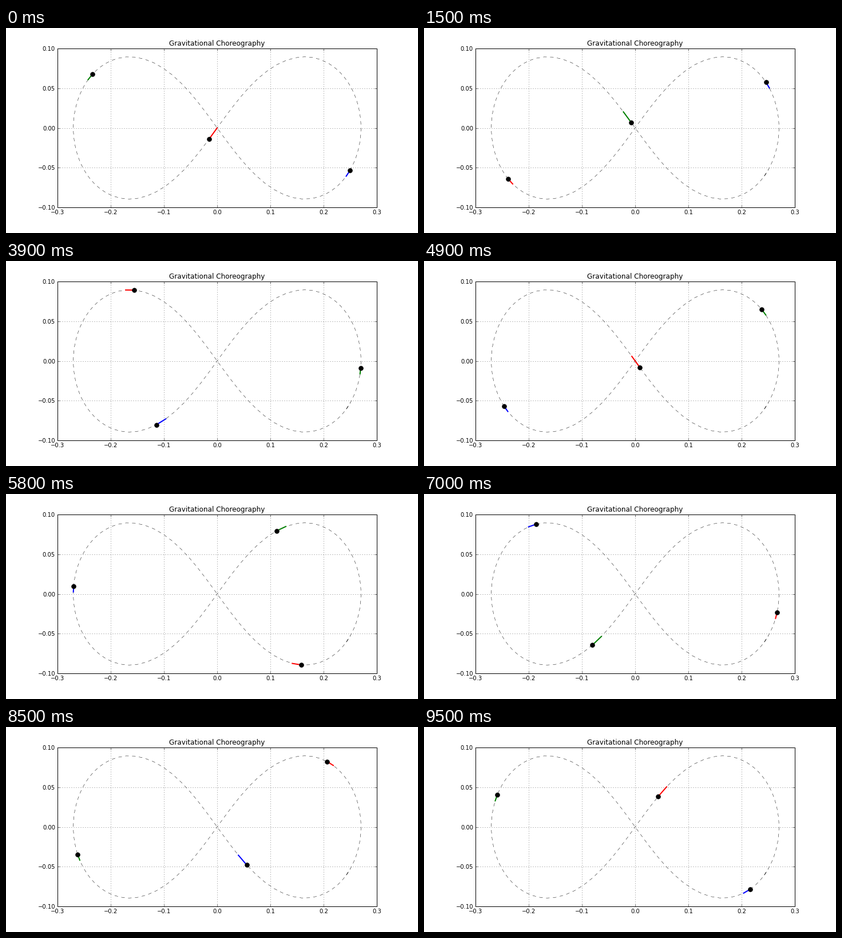
A matplotlib script that plays this animation: 720 px wide and 360 px high, repeating every 9600 ms.

```python
import numpy as np
import matplotlib.pyplot as plt
from matplotlib.animation import FuncAnimation

plt.rcParams.update({
    "font.family": "DejaVu Sans",
    "font.size": 10,
    "lines.scale_dashes": False,
    "axes.axisbelow": False,
    "axes.linewidth": 1.0,
})

FRAMES = 96
INTERVAL = 100
DT = 0.064
SUBSTEPS = 16
SCALE = 0.25


def accel(pos):
    """Gravity between three unit masses."""
    gap = pos[None, :, :] - pos[:, None, :]
    dist = np.sqrt((gap ** 2).sum(axis=2)) + np.eye(3)
    return (gap / dist[:, :, None] ** 3).sum(axis=1)


def rk4(pos, vel, h):
    v1, a1 = vel, accel(pos)
    v2, a2 = vel + h / 2 * a1, accel(pos + h / 2 * v1)
    v3, a3 = vel + h / 2 * a2, accel(pos + h / 2 * v2)
    v4, a4 = vel + h * a3, accel(pos + h * v3)
    return (pos + h / 6 * (v1 + 2 * v2 + 2 * v3 + v4),
            vel + h / 6 * (a1 + 2 * a2 + 2 * a3 + a4))


def orbit(steps):
    """Figure-eight solution, sampled every DT; shape (steps + 1, 3, 2)."""
    start = np.array([0.97000436, -0.24308753])
    speed = np.array([-0.93240737, -0.86473146])
    pos = np.array([start, -start, 0 * start])
    vel = np.array([-speed / 2, -speed / 2, speed])
    track = [pos]
    for _ in range(steps):
        for _ in range(SUBSTEPS):
            pos, vel = rk4(pos, vel, DT / SUBSTEPS)
        track.append(pos)
    return SCALE * np.array(track)


track = orbit(100)

fig = plt.figure(figsize=(10, 5), dpi=72, facecolor="white")
ax = fig.add_axes([0.125, 0.125, 0.775, 0.775])
ax.set_xlim(-0.3, 0.3)
ax.set_ylim(-0.1, 0.1)
ax.set_xticks(np.linspace(-0.3, 0.3, 7))
ax.set_yticks(np.linspace(-0.1, 0.1, 5))
ax.xaxis.set_major_formatter("{x:.1f}")
ax.yaxis.set_major_formatter("{x:.2f}")
ax.tick_params(direction="in", length=4, width=0.5, pad=4, top=True, right=True)
ax.grid(color="black", linewidth=0.5, linestyle=(0, (1, 3)))
ax.set_title("Gravitational Choreography", fontsize=12, pad=5)

ax.plot(track[:, 0, 0], track[:, 0, 1], color="black", linewidth=0.5,
        linestyle=(0, (6, 6)))
tails = [ax.plot([], [], color=c, linewidth=2)[0] for c in ("b", "g", "r")]
heads = [ax.plot([], [], "o", color="black", markersize=8,
                 markeredgewidth=0.5)[0] for _ in tails]


def draw(i):
    for body, (tail, head) in enumerate(zip(tails, heads)):
        x, y = track[i:i + 2, body].T
        tail.set_data(x, y)
        head.set_data(x[1:], y[1:])
    return tails + heads


anim = FuncAnimation(fig, draw, frames=FRAMES, interval=INTERVAL,
                     repeat=True, repeat_delay=0)
plt.show()
```
